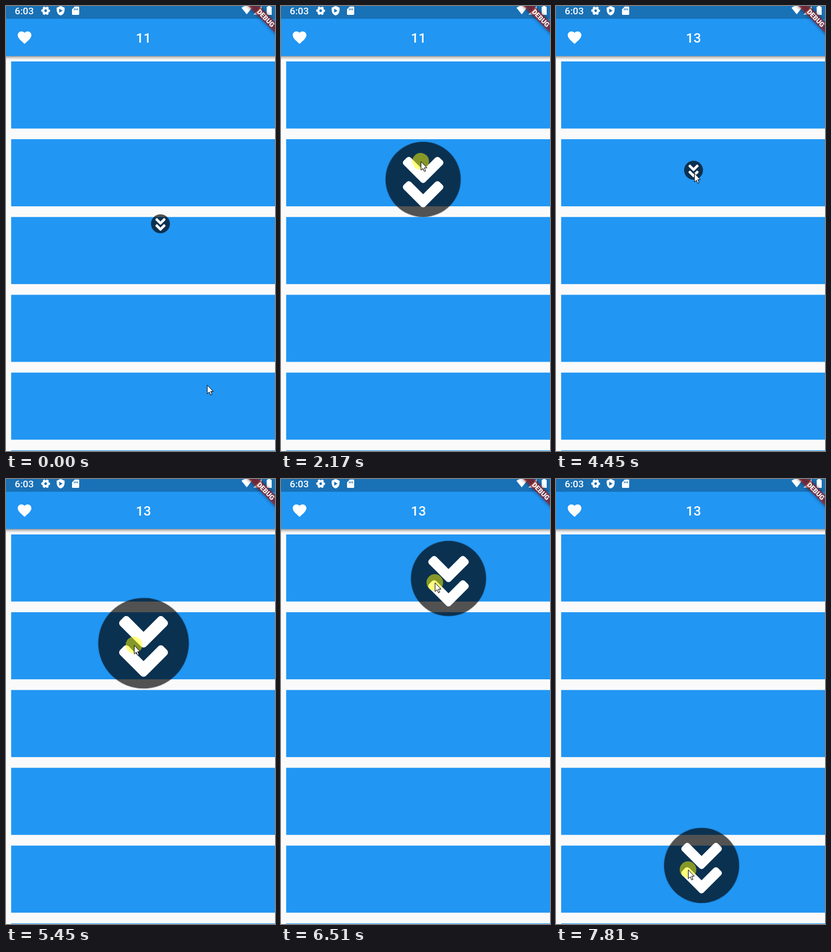
An HTML page that plays this animation: 485 by 802 pixels, repeating every 8000 ms.

```html
<!DOCTYPE html>
<html lang="en">
<head>
<meta charset="utf-8">
<title>Floating button</title>
<style>
html, body { margin: 0; width: 100%; height: 100%; overflow: hidden; background: #fafafa; }
svg { display: block; }
text { font-family: Roboto, Arial, sans-serif; font-weight: 500; fill: #fff; }
</style>
</head>
<body>
<svg width="485" height="802" viewBox="0 0 485 802">
  <defs>
    <linearGradient id="shade" x2="0" y2="1">
      <stop stop-opacity=".42"/><stop offset=".4" stop-opacity=".18"/><stop offset="1" stop-opacity="0"/>
    </linearGradient>
    <filter id="blur" x="-20%" y="-80%" width="140%" height="260%"><feGaussianBlur stdDeviation="3"/></filter>
  </defs>
  <g id="cards" fill="#2196f3"></g>

  <rect y="90" width="485" height="7" fill="url(#shade)"/>
  <rect width="485" height="90" fill="#2196f3"/>
  <rect width="485" height="23" fill="#1971b6"/>

  <g fill="#fff">
    <text x="15.8" y="15" font-size="17.4">6:03</text>
    <g fill="none" stroke="#fff">
      <circle cx="71.5" cy="8.5" r="4.4" stroke-width="4"/>
      <circle cx="71.5" cy="8.5" r="6.7" stroke-width="2.4" stroke-dasharray="3.9 3.117" stroke-dashoffset="1.95"/>
    </g>
    <path fill-rule="evenodd" d="M98.5 0 105.6 3V8Q105 15 98.5 17 92 15 91.4 8V3ZM96 4.7V12L102 8.4Z"/>
    <path d="M124 1H131L132 2V15L131 16H120L119 15V6Z"/>
    <path d="M122.5 4.5v3m2.8-3v3m2.8-3v3" transform="translate(.7)" stroke="#1971b6" stroke-width="1.5"/>
    <path d="M434 15 424.5 3.3Q434-4 443.5 3.3Z"/>
    <path d="M446 15.5H461V0Z"/>
    <path d="M470 1.5H472.3V-1H476.7V1.5H479V16H470Z"/>
    <path transform="translate(18.7 42) scale(1.23)" d="M12 21.35l-1.45-1.32C5.4 15.36 2 12.28 2 8.5 2 5.42 4.42 3 7.5 3c1.74 0 3.41.81 4.5 2.09C13.09 3.81 14.76 3 16.5 3 19.58 3 22 5.42 22 8.5c0 3.78-3.4 6.86-8.55 11.54z"/>
    <text id="count" x="234.3" y="66" font-size="24"></text>
  </g>

  <g transform="translate(468.5 22) rotate(45)">
    <rect x="-50" y="-7" width="100" height="14" filter="url(#blur)" opacity=".5"/>
    <rect x="-50" y="-7" width="100" height="14" fill="#b71c1c" fill-opacity=".56"/>
    <text y="4.3" font-size="12.2" text-anchor="middle" style="font-weight:900">DEBUG</text>
  </g>

  <g id="button">
    <circle r="67.5" fill-opacity=".67"/>
    <circle r="67.8" fill="none" stroke="#000" stroke-opacity=".2" stroke-width="1.5"/>
    <g transform="translate(0 4.8) scale(.228) translate(-160 -256)" fill="#fff">
      <path id="chevron" d="M143 256.3L7 120.3c-9.4-9.4-9.4-24.6 0-33.9l22.6-22.6c9.4-9.4 24.6-9.4 33.9 0l96.4 96.4 96.4-96.4c9.4-9.4 24.6-9.4 33.9 0L313 86.3c9.4 9.4 9.4 24.6 0 33.9l-136 136c-9.4 9.5-24.6 9.5-34 .1z"/>
      <use href="#chevron" y="192"/>
    </g>
  </g>
  <g id="cursor">
    <circle id="press" r="15" fill="#ff0" fill-opacity=".5"/>
    <path d="M.5.5V16.2L4.1 12.9 6.5 18.5 9 17.4 6.6 11.9H11.3Z" fill="#fff" stroke="#000"/>
  </g>
</svg>
<script>
const $ = id => document.getElementById(id);

for (let i = 0; i < 6; i++)
  $('cards').innerHTML += `<rect x="9.3" y="${99.9 + i * 140.2}" width="476" height="120.9"/>`;

const SMALL = 17 / 67.5;
const clamp = u => Math.min(1, Math.max(0, u));
const mix = (a, b, u) => a + (b - a) * u;
const easeOut = u => 1 - (1 - u) ** 3;

// Curved moves: start time, end time, control point, end point, easing
const buttonMoves = [
  [1600, 2300, [272, 340], [248, 296]],
  [5520, 6150, [234, 332], [191.5, 238]],
  [6150, 6840, [328, 82], [346.5, 308]],
  [7040, 7810, [283, 525], [262.5, 696.5], easeOut]
];
const cursorMoves = [
  [0, 730, [168, 228], [281, 394]],
  [1520, 2200, [272, 320], [250, 276]],
  [3300, 3630, [251, 288], [249, 301]],
  [5380, 6150, [144, 293], [167, 245.5]],
  [6150, 6840, [303, 89], [322, 315.5]],
  [7040, 7810, [236, 678], [238, 704], easeOut]
];

function travel(t, from, moves) {
  for (const [start, end, via, to, ease = u => u] of moves) {
    if (t < start) break;
    const u = ease(clamp((t - start) / (end - start)));
    from = from.map((a, i) => mix(mix(a, via[i], u), mix(via[i], to[i], u), u));
  }
  return from;
}

function elastic(u) {
  return u <= 0 ? 0 : u >= 1 ? 1 : 1 + 2 ** (-10 * u) * Math.sin((u - .1) * 5 * Math.PI);
}

// The button springs open on a long press and shrinks on release
function scaleAt(t) {
  const opened = t < 5400 ? 1509 : 5400;
  const shrink = t < 5400 ? clamp((t - 2490) / 280) : 0;
  return mix(SMALL, 1, elastic((t - opened) / 300) * (1 - shrink) ** 1.5);
}

function isPressed(t) {
  const tapped = [2970, 3830, 4320].some(start => t >= start && t < start + 130);
  return tapped || t >= 1000 && t < 2500 || t >= 4980;
}

const place = (id, [x, y], scale = 1) =>
  $(id).setAttribute('transform', `translate(${x} ${y}) scale(${scale})`);

function draw(now) {
  const t = now % 8000;
  place('button', travel(t, [278.5, 392.5], buttonMoves), scaleAt(t));
  place('cursor', travel(t, [363, 684], cursorMoves));
  $('press').style.display = isPressed(t) ? '' : 'none';
  $('count').textContent = t < 3970 ? 11 : t < 4450 ? 12 : 13;
  requestAnimationFrame(draw);
}
draw(0);
</script>
</body>
</html>
```
